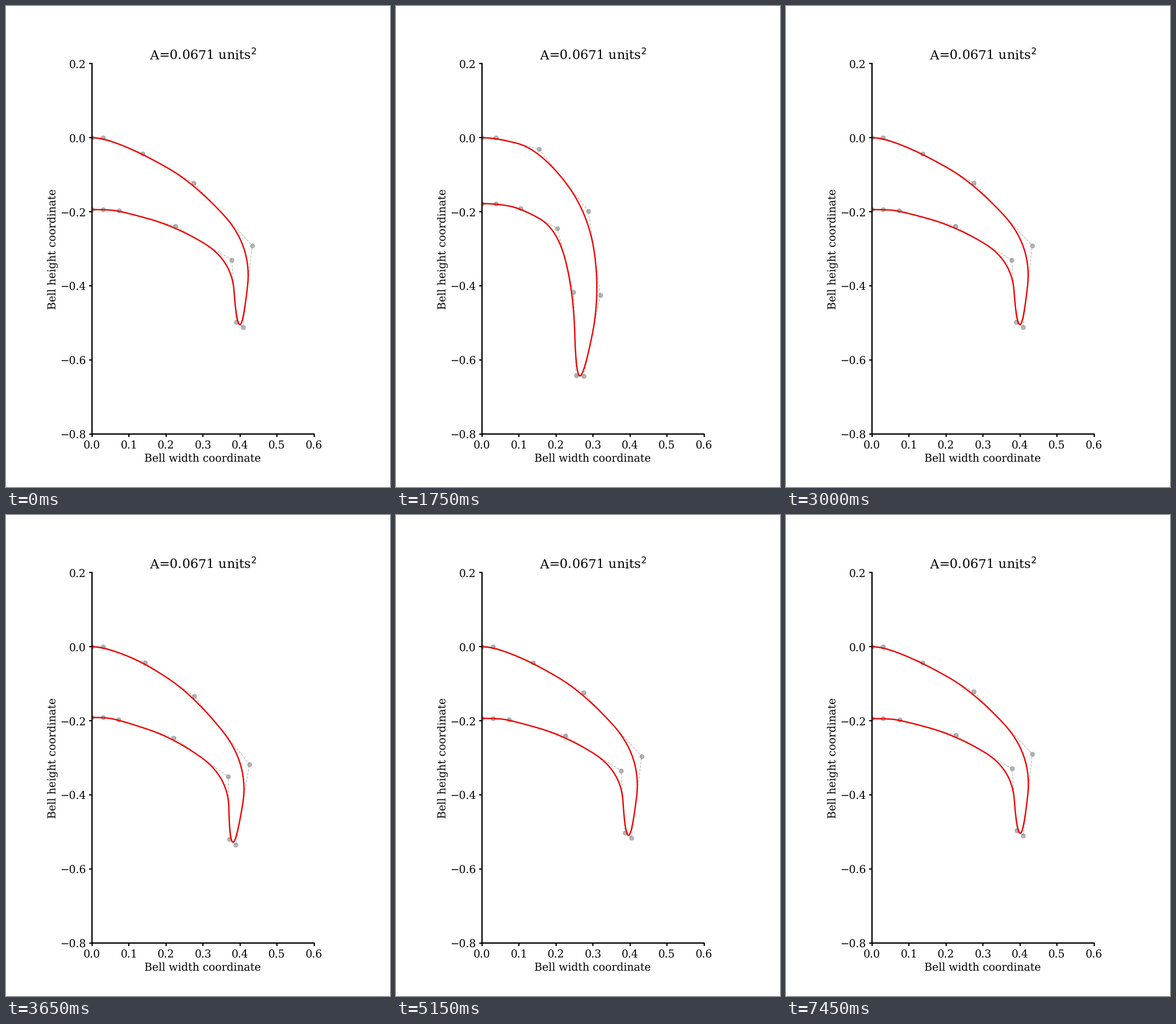
Recreate the animation shown at these times as a matplotlib script. Size 669 by 837 pixels, loop 7.5 s.

```python
import numpy as np
import matplotlib.pyplot as plt
from matplotlib.animation import FuncAnimation

W, H, DPI = 669, 837, 128
PX = 72 / DPI          # points per pixel
LEFT, TOP, SCALE = 149.8, 100.3, 644.5
FRAMES, STEP = 150, 50
BASE = 18.6 * PX

plt.rcParams.update({
    "font.family": "DejaVu Serif",
    "font.size": BASE,
    "mathtext.fontset": "dejavusans",
    "text.hinting": "none",
})


def bell(shoulder, depth, *free):
    """Control polygon from the apex along the outer wall and back inside."""
    return np.array([(0, 0), (shoulder, 0), *free,
                     (shoulder, depth), (0, depth)])


REST = bell(.030, -.194, (.137, -.043), (.275, -.122), (.433, -.291),
            (.408, -.511), (.390, -.498), (.378, -.330), (.226, -.239),
            (.074, -.197))
FLARE = bell(.020, -.196, (.100, -.006), (.281, -.133), (.366, -.359),
             (.402, -.459), (.398, -.477), (.287, -.352), (.195, -.244),
             (.074, -.203))
SQUEEZE = bell(.037, -.178, (.154, -.031), (.288, -.198), (.321, -.424),
               (.276, -.643), (.255, -.642), (.249, -.416), (.204, -.245),
               (.104, -.190))


def pulse(t, peak, rise, fall):
    u = (t - peak) / (rise if t < peak else fall)
    return np.cos(np.pi / 2 * np.clip(u, -1, 1)) ** 2


def ringing(t, start=3, half=2.55, decay=.8):
    s = max(t - start, 0)
    return 3.1 * np.exp(-decay * s) * np.sin(np.pi * s / half)


def droop(pts, k):
    """Swing the margin down and inward by k."""
    x, y = pts[2:-2].T
    pts[2:-2] += k * np.column_stack([.04 * (y + .15),
                                      -.07 * np.maximum(x - .15, 0)])
    pts[-2:, 1] *= 1 - .012 * k
    return pts


def control_points(t):
    windup = pulse(t, .28, .28, .30)
    flare = 1.025 * pulse(t, .90, .50, .90) - .16 * windup
    squeeze = 1.035 * pulse(t, 1.85, .94, .64)
    pts = REST + flare * (FLARE - REST) + squeeze * (SQUEEZE - REST)
    return droop(pts, ringing(t) + .5 * windup)


def bspline(pts, n=16):
    """Clamped quadratic B-spline."""
    mids = (pts[1:] + pts[:-1]) / 2
    mids[0], mids[-1] = pts[0], pts[-1]
    u = np.linspace(0, 1, n)[:, None]
    return np.vstack([(1 - u) ** 2 * a + 2 * u * (1 - u) * c + u * u * b
                      for a, c, b in zip(mids, pts[1:-1], mids[1:])])


fig = plt.figure(figsize=(W / DPI, H / DPI), dpi=DPI, facecolor="white")
ax = fig.add_axes([LEFT / W, 1 - (TOP + SCALE) / H, .6 * SCALE / W, SCALE / H])
ax.set(xlim=(0, .6), ylim=(-.8, .2),
       xticks=np.arange(7) / 10, yticks=np.arange(-4, 2) / 5)
ax.tick_params(length=5.4 * PX, width=2.2 * PX, pad=5.4 * PX)
ax.spines[["top", "right"]].set_visible(False)
for side in ("left", "bottom"):
    ax.spines[side].set(linewidth=2.3 * PX, snap=False)


def label(x, y, text, size=BASE, rotation=0):
    fig.text(x / W, 1 - y / H, text, size=size, rotation=rotation,
             ha="center", va="baseline", rotation_mode="anchor")


label(343.3, 93.6, "A=0.0671 units$^2$", size=1.2 * BASE)
label(343, 792.7, "Bell width coordinate")
label(86.3, 422.7, "Bell height coordinate", rotation=90)

polygon, = ax.plot([], [], "o--", color="gray", alpha=.55, lw=1.2 * PX,
                   ms=7.2 * PX, mew=1.3 * PX)
outline, = ax.plot([], [], color="#f00000", lw=2.35 * PX)


def draw(i):
    pts = control_points(i * STEP / 1000)
    polygon.set_data(*pts.T)
    outline.set_data(*bspline(pts).T)
    return polygon, outline


anim = FuncAnimation(fig, draw, frames=FRAMES, interval=STEP,
                     repeat=True, repeat_delay=0)
plt.show()
```
